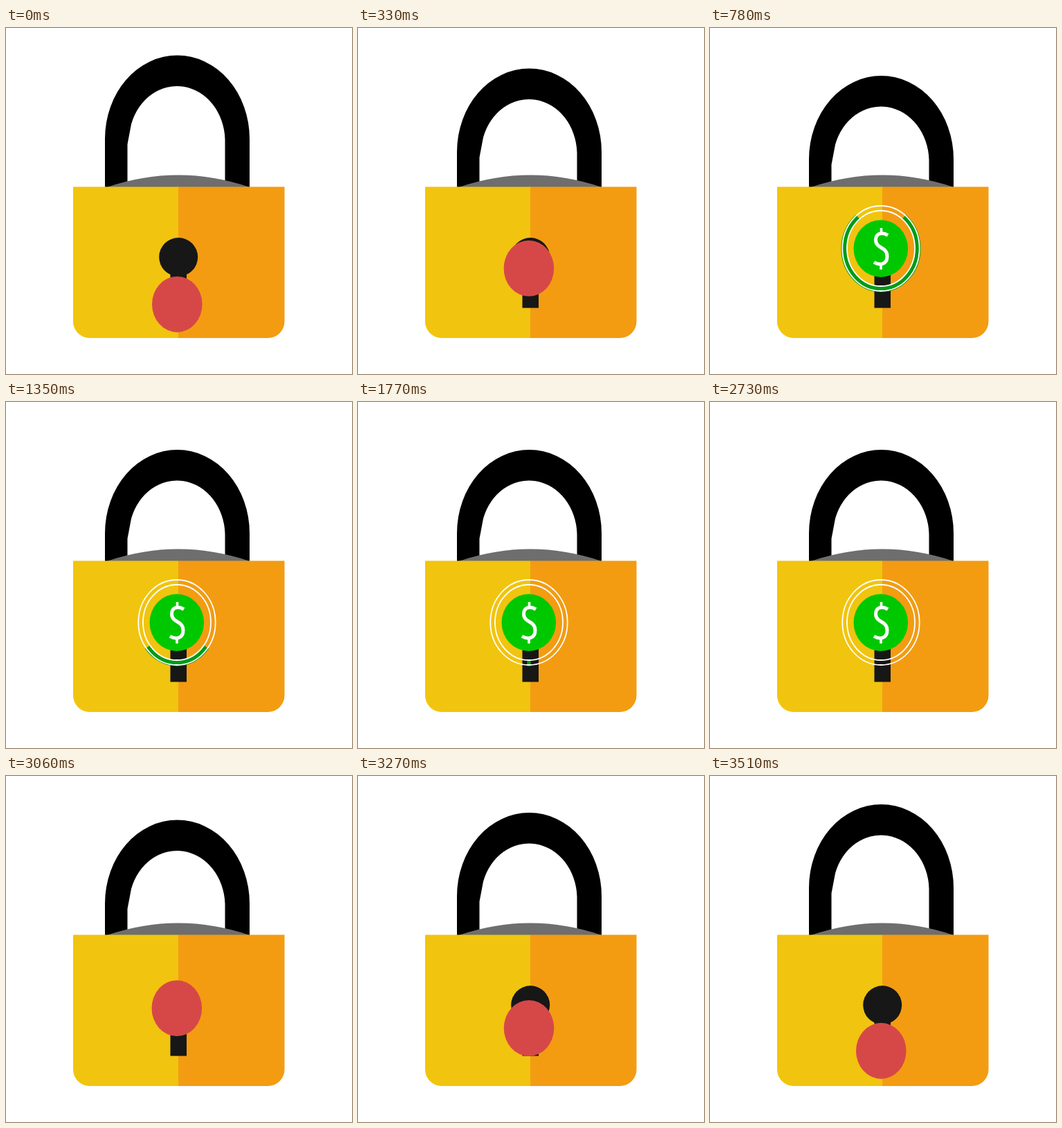
Write an HTML page that moves like this. It is 500 px wide and 500 px high and loops after 3.54 s.

```html
<!DOCTYPE html>
<html lang="en">
<head>
<meta charset="utf-8">
<title>Padlock</title>
<style>
  html, body { margin: 0; width: 100%; height: 100%; overflow: hidden; background: #fff; }
  svg { display: block; width: 100vw; height: 100vh; }
</style>
</head>
<body>
<svg viewBox="0 0 500 500">
  <path id="shackle" d="M143 270 V160 A104.5 120.5 0 0 1 352 160 V270 H316.5 V161
    A69.5 80 0 0 0 181 139 L175.5 168 V270 Z"/>
  <path d="M146 230 Q249 195 352 230 Z" fill="#6e6e6e"/>
  <path d="M97 229.5 H249 V448 H121 A24 24 0 0 1 97 424 Z" fill="#f1c40f"/>
  <path d="M249 229.5 H402.5 V424 A24 24 0 0 1 378.5 448 H249 Z" fill="#f39c12"/>
  <g fill="#171717">
    <circle cx="249.2" cy="331" r="28"/>
    <rect x="237.5" y="340" width="23.5" height="64.5"/>
  </g>
  <ellipse id="ball" rx="36.3" ry="40.4" fill="#d64848"/>
  <g id="rings" fill="none">
    <path id="arc" pathLength="360" stroke="#009b16" stroke-width="8"
      d="M247 377.7 A53.5 59 0 0 1 247 259.7 A53.5 59 0 0 1 247 377.7"/>
    <g stroke="#fff" stroke-width="1.8">
      <ellipse cx="247" cy="318.5" rx="55.7" ry="61.5"/>
      <ellipse cx="247" cy="318.5" rx="49" ry="54.5"/>
    </g>
  </g>
  <g id="coin">
    <ellipse cx="246.8" cy="318.7" rx="39.3" ry="41.3" fill="#00c800"/>
    <g fill="none" stroke="#fff">
      <path stroke-width="5" d="M257 299.5 C247 293.5 239.5 298 239.5 306
        C239.5 320 256 315 256 330 C256 342 245 343.5 237 338.5"/>
      <path stroke-width="3.6" d="M247.5 289 V297 M247 340 V349"/>
    </g>
  </g>
</svg>
<script>
const LOOP = 3540, STEP = 30;
const el = id => document.getElementById(id);
const [shackle, ball, rings, arc, coin] =
  ['shackle', 'ball', 'rings', 'arc', 'coin'].map(el);

// Each track is a list of [time, value], joined by straight lines.
const tracks = {
  shackle: [[0, 0], [512, 29.5], [2950, 29.5], [3540, 0]],
  ball: [[0, 0], [512, 1], [2937, 1], [3525, 0]],
  arc: [[546, 180], [1673, 0], [1752, 0], [2690, 150]]
};

function valueAt(track, t) {
  const i = track.findIndex(k => k[0] > t);
  if (i === 0) return track[0][1];
  if (i < 0) return track[track.length - 1][1];
  const [t0, v0] = track[i - 1], [t1, v1] = track[i];
  return v0 + (v1 - v0) * (t - t0) / (t1 - t0);
}

const between = (t, from, to) => t >= from && t < to;
const show = (node, on) => node.setAttribute('visibility', on ? 'inherit' : 'hidden');

function draw(t) {
  const rise = valueAt(tracks.ball, t);
  const sweep = valueAt(tracks.arc, t);
  shackle.setAttribute('transform', `translate(0 ${valueAt(tracks.shackle, t)})`);
  ball.setAttribute('cx', 247.3 - 0.6 * rise);
  ball.setAttribute('cy', 399.3 - 80.5 * rise);
  arc.setAttribute('stroke-dasharray', `${sweep} ${360 - 2 * sweep} ${sweep} 0.001`);
  show(rings, between(t, 540, 2850));
  show(arc, between(t, 540, 2690) && sweep > 0);
  show(coin, between(t, 570, 2850));
}

const start = performance.now();
function tick() {
  const t = (performance.now() - start) % LOOP;
  draw(Math.floor(t / STEP) * STEP);
  requestAnimationFrame(tick);
}
tick();
</script>
</body>
</html>
```
